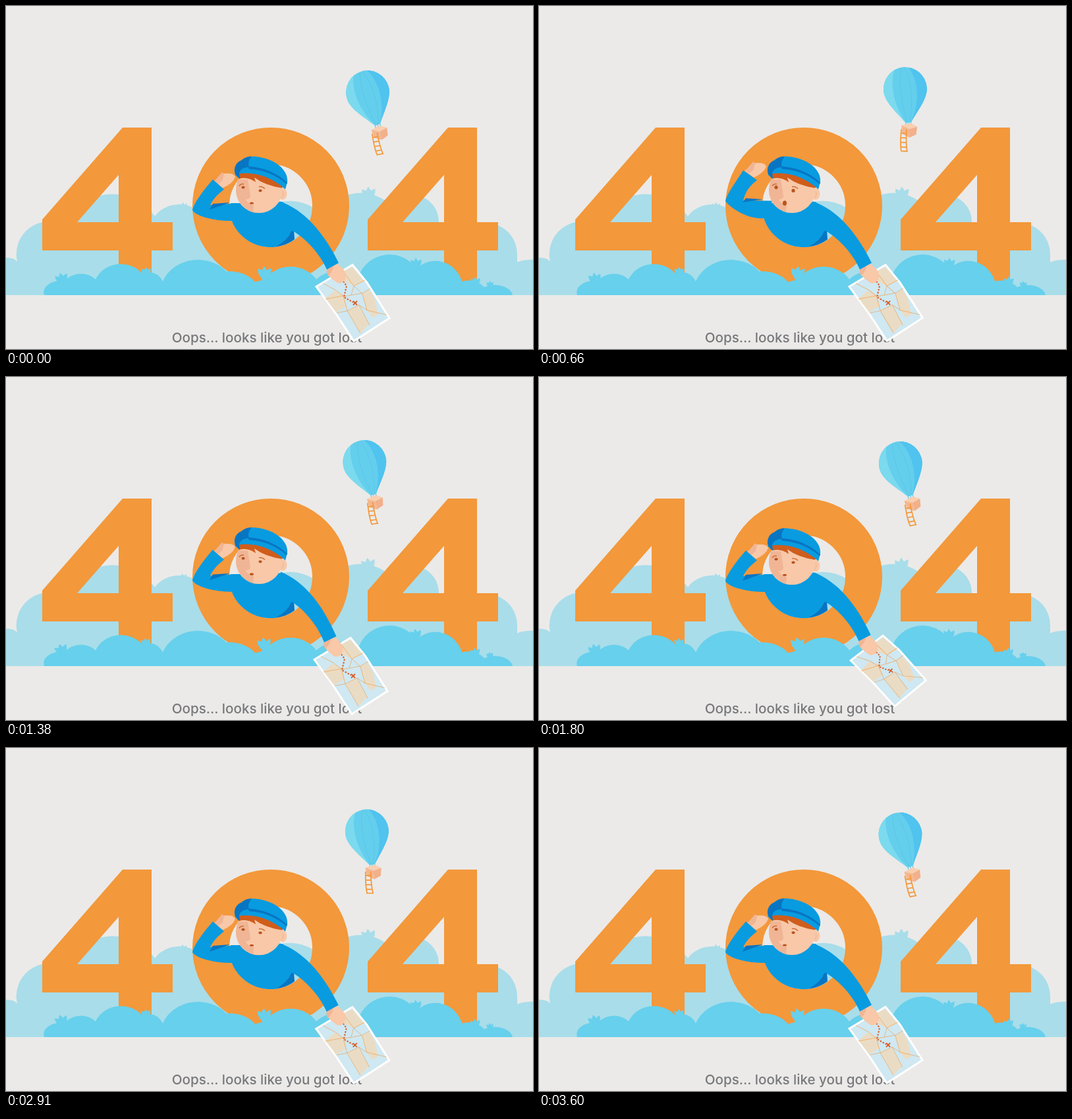
Write an HTML page that moves like this. It is 800 by 522 pixels and loops after 3.63 s.

```html
<!DOCTYPE html>
<html lang="en">
<head>
<meta charset="utf-8">
<title>404</title>
<style>
  html, body { margin: 0; width: 100%; height: 100%; overflow: hidden; background: #ebeae8; }
  svg { display: block; width: 100vw; height: 100vh; }
  text { font: 500 20.6px Inter, sans-serif; fill: #77787b; }
  .blue { fill: #089be0; }
  .navy { fill: #0875c2; }
  .skin { fill: #f8c8a8; }
  .shade { fill: #f0b595; }
  .tan { fill: #eadcc4; }
  .line { fill: none; stroke: #f3983b; }
</style>
</head>
<body>
<svg viewBox="0 0 800 522">
  <defs>
    <clipPath id="envelope"><use href="#drop"/></clipPath>
    <path id="four" fill-rule="evenodd" d="M177 185H221V329H253V372H221V430H171V372H55V325ZM171 257V329H108Z"/>
    <path id="leaf" d="M-3 5C-6 -4 -5 -11 0 -17C5 -11 6 -4 3 5Z"/>
    <g id="tuft">
      <use href="#leaf" transform="rotate(-40)"/>
      <use href="#leaf" transform="rotate(-4)"/>
      <use href="#leaf" transform="rotate(34)"/>
    </g>
  </defs>

  <g fill="#a9ddea">
    <path d="M0 440V383Q13 383 17 389A50 50 0 0 1 88 333A80 80 0 0 1 226 320A42 34 0 0 1 300 320L365 346A70 74 0 0 1 480 318A65 62 0 0 1 585 304A40 41 0 0 1 657 330V345L700 342A46 48 0 0 1 776 379V390Q784 386 800 386V440Z"/>
    <use href="#tuft" transform="translate(551 292)"/>
    <use href="#tuft" transform="translate(269 309) scale(.6)"/>
    <use href="#tuft" transform="translate(290 317) scale(.6)"/>
  </g>

  <g id="balloon">
    <path id="drop" fill="#64ceed" d="M-33 0A33 34 0 0 1 33 0C33 17 14 36 4 51H-4C-14 36 -33 17 -33 0Z"/>
    <g clip-path="url(#envelope)">
      <path fill="#7cdaee" d="M-40 -40H-8C-24 -20 -22 20 -3 52H-40Z"/>
      <path fill="#50c3ef" d="M8 -40H40V52H3C22 20 22 -16 4 -40Z"/>
      <path fill="none" stroke="#58c4e6" stroke-width=".7" d="M-2 -35C-10 -10 -8 24 -1 52M1 -35C12 -10 10 24 1 52"/>
    </g>
    <path fill="none" stroke="#50bde0" d="M-4 51L-3 59M0 51V60M4 51L4 59"/>
  </g>
  <g id="basket">
    <path fill="#f9cfb0" d="M-12 -7L2 -11L12 -6L0 -2Z"/>
    <path fill="#f5b78f" d="M-12 -7L0 -2L1 11L-10 6Z"/>
    <path fill="#f2b08b" d="M0 -2L12 -6L11 6L1 11Z"/>
    <path class="line" stroke-width="1.7" d="M-12 -1C-12 12 -13 23 -10 33M-4 -1C-4 12 -4 23 -1 33M-12 5H-4M-12 12H-4M-12 19H-4M-12 26H-3M-10 32H-1"/>
  </g>

  <g fill="#f3983b">
    <use href="#four"/>
    <use href="#four" x="494"/>
    <circle class="line" cx="402" cy="304" r="91" stroke-width="56"/>
  </g>

  <g fill="#67d0ec">
    <path d="M58 440A28 18 0 0 1 90 418A28 22 0 0 1 136 416A42 39 0 0 1 207 407A24 25 0 0 1 238 419A57 50 0 0 1 335 404A45 32 0 0 1 378 420L393 416A46 41 0 0 1 471 416A45 37 0 0 1 535 412A50 51 0 0 1 623 400A42 44 0 0 1 692 419A30 24 0 0 1 726 428A27 17 0 0 1 769 440Z"/>
    <use href="#tuft" transform="translate(86 421) rotate(-10) scale(.9)"/>
    <use href="#tuft" transform="translate(213 409) scale(.7)"/>
    <use href="#tuft" transform="translate(393 413)"/>
    <use href="#tuft" transform="translate(623 397) scale(.8)"/>
    <use href="#tuft" transform="translate(713 424) scale(.7)"/>
    <use href="#tuft" transform="translate(735 427) scale(.5)"/>
  </g>
  <path fill="#ebeae8" d="M0 440H800V470H0Z"/>

  <text x="396" y="512" text-anchor="middle">Oops... looks like you got lost</text>

  <g id="hand">
    <path class="skin" d="M315 267L331 255Q346 254 348 260Q345 270 329 277Z"/>
    <path class="shade" d="M316 267L328 253L331 255L329 265L322 271Z"/>
  </g>
  <path id="sleeve" class="blue"/>
  <path id="fold" class="navy"/>
  <path class="blue" d="M341 300H385L420 298L446 325L437 341V356A63 63 0 0 1 342 325Z"/>
  <path class="navy" d="M437 341L438 355Q425 365 409 366Q427 358 433 343Z"/>

  <g id="map">
    <path fill="#cfe8f2" stroke="#fff" stroke-width="3" d="M471 427L526 394L548 421L582 475L528 510L500 467Z"/>
    <path class="tan" d="M512 404L526 397L544 419L528 426L513 419ZM485 445L499 433L513 441L517 457L501 466ZM541 438L552 432L560 446L565 470L556 474L548 463ZM519 464L535 456L551 484L538 498Z"/>
    <path class="line" opacity=".6" stroke-width="1" d="M481 422L500 432L513 442L541 437L553 430M512 404L528 426L524 440M485 446L512 441L518 464L502 467M518 464L536 455L548 463L578 470M548 463L541 438L528 426L545 417M518 464L538 498M536 455L552 486"/>
    <path fill="none" stroke="#d95b25" stroke-width="2" stroke-dasharray="2.5 2" d="M512 419L517 426L513 443L527 451"/>
    <path stroke="#d95b25" stroke-width="1.8" d="M527 449L533 455M533 449L527 455"/>
  </g>
  <g id="arm">
    <path class="skin" d="M487 398L503 392C511 398 518 406 516 413C514 421 505 425 500 419C494 415 487 411 487 398Z"/>
    <path class="shade" d="M487 399L497 396Q497 402 489 411Q486 406 487 399Z"/>
    <path class="blue" d="M415 297C453 310 483 346 505 391L487 401C478 380 457 354 433 341Z"/>
  </g>

  <g id="head">
    <ellipse class="skin" cx="420" cy="286" rx="6.5" ry="9"/>
    <path fill="none" stroke="#eeb08e" d="M418 292Q423 287 420 282"/>
    <ellipse class="skin" cx="384" cy="281" rx="35" ry="34"/>
    <path class="shade" d="M352 264Q346 280 352 294Q359 308 375 314L376 303Q363 298 364 294Q371 294 371 289L367 264Z"/>
    <path fill="#cf5d1c" d="M354 252Q390 250 423 273L419 277Q393 273 377 261L379 268Q366 259 354 263Z"/>
    <path class="blue" d="M348 258C345 242 359 229 373 229C400 229 429 245 427 268L424 279C407 263 382 252 355 255Z"/>
    <path class="navy" d="M347 252C346 243 352 236 358 235C361 231 367 229 373 229Q366 237 369 245Q356 246 354 254L355 263Q349 260 347 252Z"/>
    <path class="navy" d="M367 244Q403 246 427 269L426 271Q402 250 369 248Z"/>
    <g id="face" fill="#b9531d">
      <ellipse class="eye" cx="360" cy="276"/>
      <ellipse class="eye" cx="386" cy="281"/>
      <ellipse id="mouth" cx="373" cy="300"/>
      <path fill="none" stroke="#c8652b" stroke-width="1.3" d="M354 274Q356 270 361 271M384 275Q389 274 393 278"/>
    </g>
  </g>
</svg>
<script>
const LOOP = 3630, STEP = 30;
const $ = id => document.getElementById(id);
const set = (el, attrs) => { for (const k in attrs) el.setAttribute(k, attrs[k]); };
const move = (id, transform) => set($(id), { transform });

// Smooth step from 0 to 1, and smooth bump of height 1 around a centre
function rise(t, from, to) {
  const x = Math.min(1, Math.max(0, (t - from) / (to - from)));
  return x * x * (3 - 2 * x);
}
const bump = (t, centre, half) => rise(t, centre - half, centre) - rise(t, centre, centre + half);

// Balloon and basket circle twice per loop; the tilt follows the line between them
function drawBalloon(a) {
  const s = Math.sin(a), c = Math.cos(a);
  const x = 550.6 + 6 * s - 1.3 * c, y = 129.2 + 2.8 * c - .6 * s;
  const basketX = 563 + 5.3 * Math.cos(a - .5), basketY = 190.7 + 2.4 * c;
  const tilt = Math.atan2(x - basketX, basketY - y) * 180 / Math.PI;
  move('balloon', `translate(${x} ${y}) rotate(${tilt})`);
  move('basket', `translate(${basketX} ${basketY}) rotate(${(tilt + 8) * 1.2})`);
}

function drawSalute(raise) {
  const up = -14 * raise;
  move('hand', `translate(${-3 * raise} ${up - 2 * raise})`);
  set($('sleeve'), {
    d: `M${314 - 4 * raise} ${264 + up}C300 ${280 + up} 285 ${300 + up} 283 ${311 + up}
        C290 ${321 + up} 320 328 348 ${327 + up / 3}L354 ${300 + up / 4}L310 ${303 + up / 2}
        C314 ${294 + up} 322 ${286 + up} 331 ${279 + up}Z`
  });
  set($('fold'), { d: `M314 ${301 + up * .6}L340 ${299 + up / 3}L309 ${310 + up * .8}Z` });
}

function drawFace(surprise, nod) {
  move('head', `translate(0 ${nod})`);
  document.querySelectorAll('.eye').forEach(eye => set(eye, { rx: 2.6, ry: 2 + .7 * surprise }));
  set($('mouth'), { rx: 3, ry: 1.6 + 2.2 * surprise });
}

function draw(t) {
  const a = 4 * Math.PI * t / LOOP;
  drawBalloon(a);
  move('tuft', `rotate(${5 * Math.sin(a)})`);

  const raise = rise(t, 0, 270) - rise(t, 1080, 1440);
  const start = bump(t, 330, 330), sag = bump(t, 2250, 800);
  drawSalute(raise);
  drawFace(raise, 4 * start + 3.2 * sag);

  const swing = 5 * start + 3 * bump(t, 1370, 350) + 2.8 * sag;
  const lift = start + bump(t, 960, 330) + bump(t, 1800, 400);
  move('arm', `rotate(${swing} 432 325)`);
  move('map', `translate(${505 - swing} ${410 + swing}) scale(${1 - .02 * lift} ${1 - .06 * lift})
    rotate(${-8 * lift}) translate(-505 -410)`);
}

const begin = performance.now();
function frame() {
  const t = (performance.now() - begin) % LOOP;
  draw(Math.floor(t / STEP) * STEP);
  requestAnimationFrame(frame);
}
frame();
</script>
</body>
</html>
```
